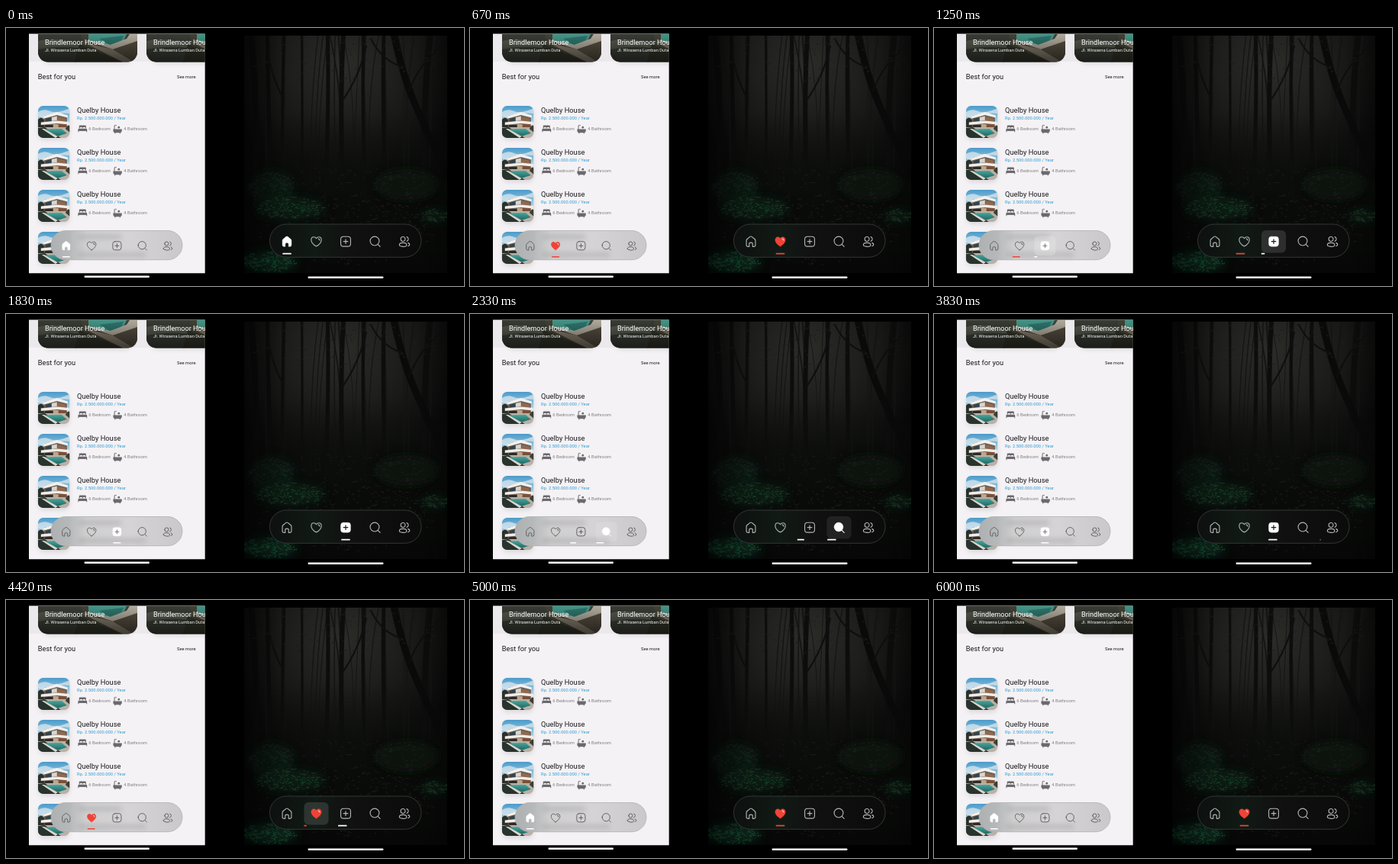
Animation, 600 px wide and 338 px high, one loop 6.08 s. Source, as an HTML page:

```html
<!DOCTYPE html>
<html lang="en">
<head>
<meta charset="utf-8">
<title>Glass navigation bar</title>
<style>
html, body { margin: 0; width: 100%; height: 100%; overflow: hidden; background: #000; }
svg { display: block; width: 100vw; height: 100vh; }
text { font-family: Roboto, sans-serif; }
</style>
</head>
<body>
<svg id="stage" viewBox="0 0 600 338" xmlns="http://www.w3.org/2000/svg">
  <defs>
    <linearGradient id="sky" x2="0" y2="1">
      <stop stop-color="#4a9bcb"/><stop offset="1" stop-color="#bcd9e5"/>
    </linearGradient>
    <linearGradient id="pool" x2="0" y2="1">
      <stop stop-color="#4aa598"/><stop offset="1" stop-color="#1b6664"/>
    </linearGradient>
    <linearGradient id="shade" x2="0" y2="1">
      <stop stop-color="#000" stop-opacity=".05"/><stop offset="1" stop-color="#000" stop-opacity=".55"/>
    </linearGradient>
    <linearGradient id="glass">
      <stop stop-color="#aeb0b2"/><stop offset=".14" stop-color="#b6b9ba"/>
      <stop offset=".27" stop-color="#d0cfd0"/><stop offset=".6" stop-color="#d5d3d5"/>
      <stop offset="1" stop-color="#cac8ca"/>
    </linearGradient>
    <linearGradient id="smoke">
      <stop stop-color="#0d100f"/><stop offset=".3" stop-color="#111a15"/>
      <stop offset=".5" stop-color="#111111"/><stop offset="1" stop-color="#0c0b0b"/>
    </linearGradient>
    <radialGradient id="fog" gradientUnits="userSpaceOnUse" cx="440" cy="50" r="160">
      <stop stop-color="#2d2e2a"/><stop offset=".45" stop-color="#1e1f1d"/>
      <stop offset="1" stop-color="#090a09"/>
    </radialGradient>
    <linearGradient id="ground" x2="0" y2="1">
      <stop stop-color="#0b0c0b" stop-opacity="0"/><stop offset=".4" stop-color="#0b0d0b" stop-opacity=".8"/>
      <stop offset="1" stop-color="#060706"/>
    </linearGradient>
    <linearGradient id="edges">
      <stop stop-color="#000" stop-opacity=".6"/><stop offset=".2" stop-color="#000" stop-opacity=".05"/>
      <stop offset=".85" stop-color="#000" stop-opacity="0"/><stop offset="1" stop-color="#000" stop-opacity=".3"/>
    </linearGradient>
    <filter id="soft" x="-30%" y="-30%" width="160%" height="160%"><feGaussianBlur stdDeviation="3"/></filter>
    <filter id="haze"><feGaussianBlur stdDeviation=".7"/></filter>
    <filter id="mist" x="-50%" y="-50%" width="200%" height="200%"><feGaussianBlur stdDeviation="7"/></filter>
    <clipPath id="phone"><rect x="30" y="7.7" width="230.7" height="313.5"/></clipPath>
    <clipPath id="photo"><rect x="312" y="10" width="266" height="311"/></clipPath>
    <clipPath id="thumbClip"><rect width="41.5" height="42" rx="7"/></clipPath>
    <clipPath id="cardClip"><rect y="-50" width="130" height="86.5" rx="13"/></clipPath>
    <clipPath id="cell"><rect x="-14" y="10" width="28" height="10"/></clipPath>

    <g id="thumb">
      <rect x="1" y="4" width="40" height="41" rx="7" fill="#8c8890" opacity=".25" filter="url(#soft)"/>
      <g clip-path="url(#thumbClip)">
        <rect width="42" height="24" fill="url(#sky)"/>
        <path d="M0 8Q8 3 16 7T42 3V10Q28 8 20 13T0 14Z" fill="#e3ecf0" opacity=".7"/>
        <path d="M0 18Q4 13 8 18L12 29H0Z" fill="#2b3129"/>
        <path d="M8 13L25 9L38 13V30H8Z" fill="#6d6058"/>
        <path d="M7 13.5L25 8L39 12.5V15.5L25 12L8 16.5Z" fill="#f3f0ec"/>
        <path d="M10 17L18 15V20L10 21Z" fill="#33444a"/>
        <path d="M18 15L25 13.5V19L18 20Z" fill="#d9d4ce"/>
        <path d="M26 14.5L36 16.5V20.5H26Z" fill="#8d6a50"/>
        <path d="M4 21.5L25 19.5L41 21V24.5L25 23L4 25Z" fill="#f1ede8"/>
        <path d="M9 25H20V30H9Z" fill="#2f2b29"/>
        <path d="M20 24H27V30H20Z" fill="#bfa58c"/>
        <path d="M27 24H37V30H27Z" fill="#7b4f38"/>
        <path d="M0 28H42V42H0Z" fill="#b9b1a8"/>
        <path d="M0 29L9 28L30 42H0Z" fill="#28332d"/>
        <path d="M8 30.5L31 30L38 36L25 40Z" fill="url(#pool)"/>
        <path d="M5 30L8 30L26 40L23 42Z" fill="#dcd6cf"/>
        <path d="M36 30Q39 24 42 26V35Z" fill="#3c3f31"/>
      </g>
    </g>

    <g id="card">
      <rect x="5" y="5" width="120" height="33" rx="12" fill="#777" opacity=".25" filter="url(#soft)"/>
      <g clip-path="url(#cardClip)">
        <rect width="130" height="37" fill="#454538"/>
        <path d="M0 0H56L60 12L50 37H0Z" fill="#3b3f37"/>
        <path d="M0 9Q20 4 38 10T62 8L56 18Q30 14 0 20Z" fill="#575a4e"/>
        <path d="M66 0H116L112 9L94 15L66 10Z" fill="#479c8f"/>
        <path d="M80 6L112 2L109 9L94 14Z" fill="#2f7a72"/>
        <path d="M62 8L67 8L95 14L116 6L120 0H130V10L98 20Z" fill="#b9b3a4"/>
        <path d="M60 11L98 20L128 37H112Z" fill="#89806f"/>
        <path d="M54 13L112 37H48Z" fill="#333528"/>
        <path d="M98 20L130 9V37H126Z" fill="#574f42"/>
        <rect width="130" height="37" fill="url(#shade)"/>
      </g>
      <text x="9" y="13.8" font-size="9.15" fill="#fff">Brindlemoor House</text>
      <text x="9" y="23.3" font-size="5.8" fill="#f4f4f4">Jl. Wirasena Lumban Duta</text>
    </g>

    <g id="row">
      <use href="#thumb"/>
      <text x="51.3" y="9.2" font-size="9.3" fill="#1b1a1c">Quelby House</text>
      <text x="51.3" y="17.6" font-size="5.8" fill="#3099d6">Rp. 2.500.000.000 / Year</text>
      <g fill="#6b696d">
        <path d="M53.9 29.2V27Q53.9 25.6 55.2 25.6H61.8Q63.1 25.6 63.1 27V29.2H62V28H59V29.2H58V28H55V29.2ZM52.6 34.2V31Q52.6 29.8 53.9 29.8H63.1Q64.4 29.8 64.4 31V34.2H63.4V32.9H53.6V34.2Z"/>
        <path d="M98.6 30.4H110V32.4Q110 34.6 108.2 35.1V36.2H107V35.3H101.6V36.2H100.4V35.1Q98.6 34.6 98.6 32.4ZM99.8 30.4V26.4Q99.8 24.7 101.5 24.7T103.2 26.2H102.3Q102.3 25.6 101.5 25.6T100.8 26.4V30.4Z"/>
        <circle cx="106" cy="28.2" r="1.4"/>
      </g>
      <g font-size="5.9" fill="#807e83">
        <text x="66.4" y="31.8">6 Bedroom</text><text x="112.5" y="31.8">4 Bathroom</text>
      </g>
    </g>
  </defs>

  <rect width="600" height="338"/>
  <g clip-path="url(#phone)">
    <rect x="30" y="7" width="231" height="315" fill="#f4f2f4"/>
    <rect x="30" y="7" width="231" height="37" fill="#ebe9eb"/>
    <use href="#card" x="42" y="8"/><use href="#card" x="184" y="8"/>
    <text x="41.8" y="67.3" font-size="9.25" fill="#1b1a1c">Best for you</text>
    <text x="224" y="66" font-size="5.85" fill="#1b1a1c">See more</text>
    <g id="rows"></g>
  </g>
  <g clip-path="url(#photo)">
    <rect x="312" y="10" width="266" height="311" fill="url(#fog)"/>
    <g id="forest" filter="url(#haze)" fill="none" stroke-linecap="round"></g>
    <rect x="312" y="10" width="266" height="311" fill="url(#edges)"/>
  </g>
  <rect x="102.5" y="324.6" width="85.5" height="2.3" rx="1.1" fill="#fff"/>
  <rect x="395.5" y="325.4" width="99" height="2.6" rx="1.3" fill="#fff"/>
</svg>
<script>
const LOOP = 6080, SLIDE = 330, TRAVEL = 19.5, RED = '#ee4437';
const $ = id => document.getElementById(id);

function add(parent, tag, attrs = {}) {
  const el = document.createElementNS('http://www.w3.org/2000/svg', tag);
  for (const k in attrs) el.setAttribute(k, attrs[k]);
  parent.appendChild(el);
  return el;
}

for (let i = 0; i < 4; i++) add($('rows'), 'use', { href: '#row', x: 41.8, y: 102 + 55 * i });

// Forest backdrop
let seed = 11;
const rnd = () => (seed = (seed * 16807) % 2147483647) / 2147483647;
const between = (a, b) => a + (b - a) * rnd();

function trunk(x, base, w, lean, color) {
  const d = `M${x + lean} 8Q${x + between(-7, 7)} 90 ${x} ${base}`;
  add($('forest'), 'path', { d, stroke: color, 'stroke-width': w });
}

function leaves(cx, cy, rx, ry, count, color) {
  let d = '';
  for (let i = 0; i < count; i++) {
    const a = between(0, 6.283), r = Math.sqrt(rnd());
    d += `M${(cx + rx * r * Math.cos(a)).toFixed(1)} ${(cy + ry * r * Math.sin(a)).toFixed(1)}`
      + `q${between(-2, 2).toFixed(1)} -1.5 ${between(-4, 4).toFixed(1)} ${between(-1, 2).toFixed(1)}`;
  }
  add($('forest'), 'path', { d, stroke: color, 'stroke-width': 1 });
}

function fern(cx, cy, rx, ry, count, base, tip) {
  add($('forest'), 'ellipse', { cx, cy, rx, ry, fill: base, opacity: .8, filter: 'url(#mist)' });
  leaves(cx, cy, rx, ry, count, tip);
}

function drawForest() {
  const f = $('forest');
  for (let i = 0; i < 26; i++) trunk(between(340, 565), between(170, 215), between(.8, 2.5), between(-14, 14), '#151614');
  add(f, 'rect', { x: 305, y: 110, width: 280, height: 220, fill: 'url(#ground)' });
  [[327, 8], [347, 5], [362, 4], [388, 3], [419, 5], [441, 6], [471, 4], [497, 5], [548, 8]].forEach(
    ([x, w]) => trunk(x, between(195, 225), w, between(-9, 9), '#0c0d0c'));
  add(f, 'path', { d: 'M508 8Q518 55 531 88T580 196', stroke: '#090a09', 'stroke-width': 9 });
  add(f, 'path', { d: 'M528 82Q545 40 574 22M517 50Q492 42 478 14M440 96Q462 66 472 24M362 90Q347 62 341 22',
    stroke: '#0e0f0e', 'stroke-width': 2.2 });
  leaves(440, 40, 130, 32, 160, '#1d1f1b');
  leaves(445, 245, 125, 65, 300, '#191b18');
  leaves(470, 265, 95, 45, 130, '#211f1c');
  fern(348, 210, 30, 22, 120, '#0b1b12', '#152b1e');
  fern(372, 236, 46, 14, 130, '#0d2417', '#17402a');
  fern(562, 246, 18, 9, 50, '#0e2417', '#183c28');
  fern(525, 205, 42, 20, 60, '#0c120e', '#13231a');
  fern(345, 306, 36, 13, 130, '#0c3320', '#165034');
}
drawForest();

// Navigation icons, drawn around their centre
const ICONS = [
  { body: 'M-8-1.5Q-8-3-7-4L-1.5-8.6Q0-9.6 1.5-8.6L7-4Q8-3 8-1.5V6Q8 9 5 9H3V4.5Q3 2 0 2T-3 4.5V9H-5Q-8 9-8 6Z' },
  { body: 'M0 8.6C-4 6.2-9 2-9-2.8C-9-6-6.8-8-4.4-8C-2.5-8-1-7 0-5.4C1-7 2.5-8 4.4-8C6.8-8 9-6 9-2.8C9 2 4 6.2 0 8.6Z',
    mark: 'M3.6-4.8Q5.9-4.6 5.9-2.2', tint: RED },
  { body: 'M-4-8.7H4Q8.7-8.7 8.7-4V4Q8.7 8.7 4 8.7H-4Q-8.7 8.7-8.7 4V-4Q-8.7-8.7-4-8.7Z', mark: 'M-3.8 0H3.8M0-3.8V3.8' },
  { body: 'M-8.7-.9A8 8 0 1 1 7.3-.9A8 8 0 1 1-8.7-.9Z', line: 'M5.2 5.2L9 9' },
  { body: 'M-6.6-4.3A4 4 0 1 1 1.4-4.3A4 4 0 1 1-6.6-4.3ZM-9 6Q-9 2.2-2.6 2.2T3.8 6T-2.6 9T-9 6Z',
    line: 'M4-8.2A4 4 0 0 1 4-.5M6.4 2.6Q9.6 3.8 9 6.2Q8.6 7.6 6.4 8' }
];

function makeBar(o) {
  const svg = $('stage');
  add(svg, 'rect', { ...o.pill, fill: o.fill, stroke: o.border, 'stroke-width': .8 });
  if (o.smudge) {
    const g = add(svg, 'g', { filter: 'url(#soft)', opacity: .35 });
    add(g, 'rect', { x: 95, y: 271, width: 56, height: 5, fill: '#85858a' });
    add(g, 'rect', { x: 95, y: 294, width: 88, height: 6, fill: '#8a8a8e' });
  }
  const root = add(svg, 'g', { transform: `translate(${o.x} ${o.y}) scale(${o.scale})` });
  const items = ICONS.map((icon, i) => {
    const g = add(root, 'g', { transform: `translate(${(i - 2) * 33.3} 0)` });
    const glow = add(g, 'rect', { x: -13.9, y: -12.7, width: 27.8, height: 25.4, rx: 5, fill: '#fff' });
    const tint = icon.tint || '#fff';
    const draw = (fill, stroke, width, mark) => {
      const s = add(g, 'g', { transform: 'scale(.64)', fill, stroke, 'stroke-width': width,
        'stroke-linecap': 'round', 'stroke-linejoin': 'round' });
      add(s, 'path', { d: icon.body });
      if (icon.line) add(s, 'path', { d: icon.line, 'stroke-width': 1.5 });
      if (icon.mark) add(s, 'path', { d: icon.mark, fill: 'none', stroke: mark, 'stroke-width': 1.6 });
      return s;
    };
    const off = draw('none', o.ink, 1.5, o.ink);
    const on = draw(tint, tint, .6, i === 1 ? '#ffc9c2' : o.mark);
    const clip = add(g, 'g', { 'clip-path': 'url(#cell)' });
    const line = add(clip, 'rect', { x: -5, y: o.lineY, width: 10, height: 1.6, rx: .6, fill: tint });
    return { glow, off, on, line };
  });
  return { items, taps: o.taps, glowMax: o.glow };
}

const bars = [
  makeBar({
    x: 145.4, y: 285.3, scale: 1, lineY: 13.6, smudge: true, glow: .2,
    pill: { x: 59, y: 265.5, width: 172, height: 38.2, rx: 19.1 },
    fill: 'url(#glass)', border: '#b2b0b2', ink: '#605f62', mark: '#77767a',
    taps: [[-1000, 0], [250, 1], [1150, 2], [2150, 3], [2900, 4], [3480, 2], [4120, 1], [4680, 0]]
  }),
  makeBar({
    x: 445, y: 279.7, scale: 1.156, lineY: 13, glow: .12,
    pill: { x: 345.5, y: 257, width: 198.5, height: 43.3, rx: 21.6 },
    fill: 'url(#smoke)', border: '#3e403f', ink: '#b4b5b4', mark: '#151716',
    taps: [[-1000, 0], [250, 1], [1150, 2], [2150, 3], [2730, 4], [3546, 2], [4330, 1]]
  })
];

const clamp = v => Math.max(0, Math.min(1, v));
const ease = v => v * v * (3 - 2 * v);

function updateBar({ items, taps, glowMax }, t) {
  let k = 0;
  while (k + 1 < taps.length && taps[k + 1][0] <= t) k++;
  const [start, now] = taps[k], prev = k ? taps[k - 1][1] : -1;
  const age = t - start;
  const e = ease(clamp(age / SLIDE)), fade = clamp(age / 90);
  items.forEach(({ glow, off, on, line }, i) => {
    const lit = i === now ? fade : i === prev ? 1 - fade : 0;
    const shift = i === now ? e - 1 : i === prev ? -e : -1;
    on.setAttribute('opacity', lit);
    off.setAttribute('opacity', 1 - lit);
    line.setAttribute('transform', `translate(${shift * TRAVEL} 0)`);
    line.setAttribute('visibility', i === now || e < .95 ? 'visible' : 'hidden');
    const press = i === now ? clamp(age / 80) * (1 - clamp((age - 140) / 120)) : 0;
    glow.setAttribute('opacity', press * glowMax);
  });
}

function frame() {
  const t = performance.now() % LOOP;
  bars.forEach(bar => updateBar(bar, t));
  requestAnimationFrame(frame);
}
frame();
</script>
</body>
</html>
```
